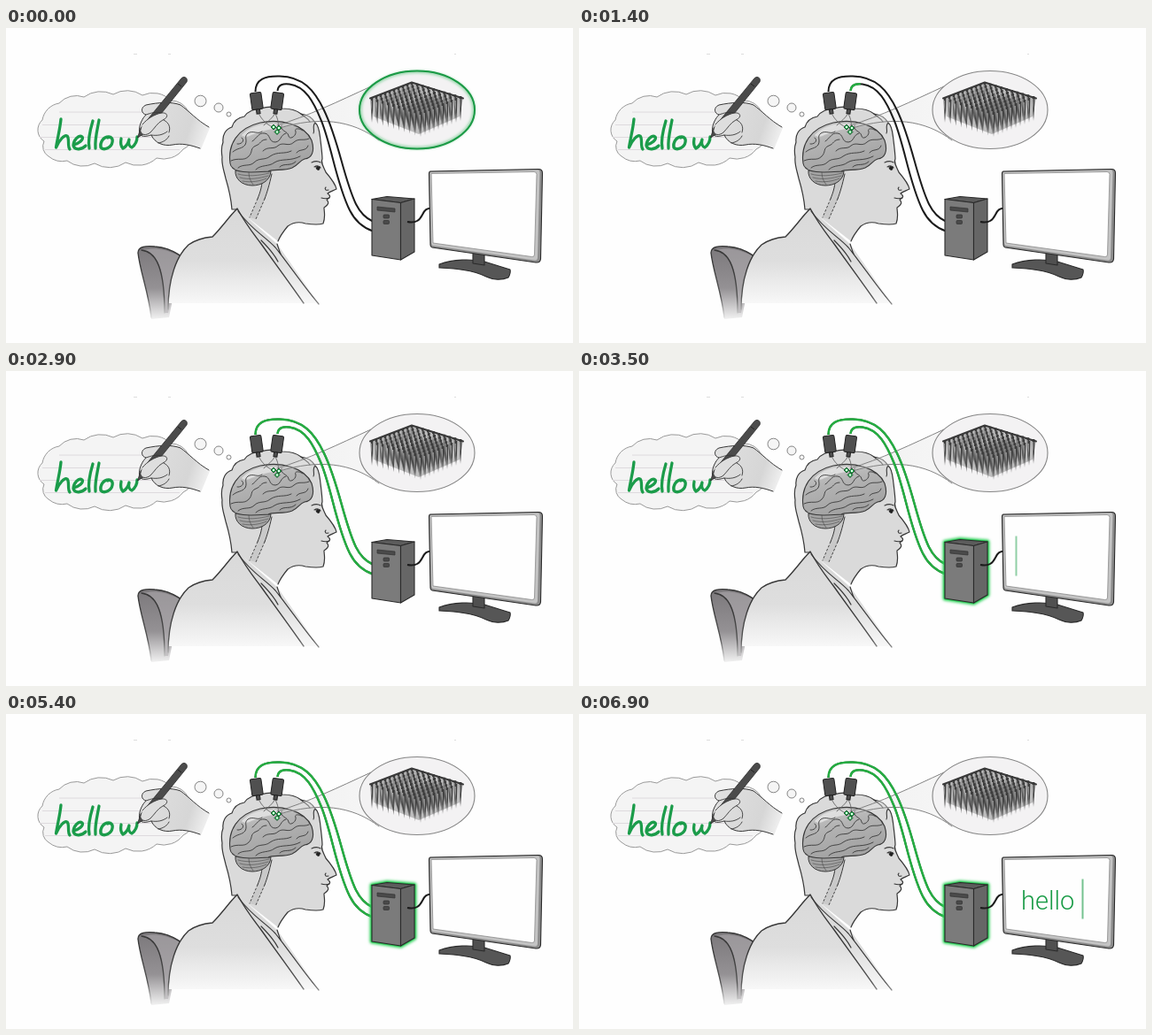
These frames come from a looping animation (640x356 px, 7 s). An HTML page:

```html
<!DOCTYPE html>
<html lang="en">
<head>
<meta charset="utf-8">
<title>Handwriting decoder</title>
<style>
html, body { margin: 0; width: 100%; height: 100%; overflow: hidden; background: #fefefe; }
svg { display: block; width: 100vw; height: 100vh; }
.ink { fill: none; stroke: #383838; stroke-linecap: round; stroke-linejoin: round; }
.pen { fill: none; stroke: #1b9c4a; stroke-width: 3.3; stroke-linecap: round; stroke-linejoin: round; }
.cable { fill: none; stroke: #1b1b1b; stroke-width: 2; }
.signal { fill: none; stroke: #25ad42; stroke-width: 2.5; stroke-dasharray: 100 200; }
.typed { font: 300 29px Roboto, "Liberation Sans", sans-serif; fill: #1a9c47; }

.ring, .signal, .glow, .caret, .bar { animation: 7s step-end infinite; }
.ring { animation-name: ring; }
.right { animation-name: right; }
.left { animation-name: left; }
.glow { animation-name: glow; }
.caret { animation-name: type; }
.bar { animation-name: blink; }

@keyframes ring {
  0% { opacity: 1; }
  10% { opacity: .93; }
  12.85% { opacity: .8; animation-timing-function: steps(5); }
  20%, 100% { opacity: 0; }
}
@keyframes right {
  0% { stroke-dashoffset: 100; }
  18.57% { stroke-dashoffset: 100; animation-timing-function: steps(14); }
  38.57%, 100% { stroke-dashoffset: 0; }
}
@keyframes left {
  0% { stroke-dashoffset: 100; }
  20% { stroke-dashoffset: 100; animation-timing-function: steps(14); }
  40%, 100% { stroke-dashoffset: 0; }
}
@keyframes glow {
  0% { opacity: 0; }
  42.85% { opacity: .5; }
  44.28%, 100% { opacity: 1; }
}
@keyframes blink {
  0% { opacity: 0; }
  47.14% { opacity: .8; }
  55.71% { opacity: 0; }
  65.71% { opacity: .8; }
  74.28% { opacity: 0; }
  82.85%, 100% { opacity: 1; }
}
@keyframes type {
  0% { transform: translateX(493.5px); }
  85.71% { transform: translateX(517px); }
  88.57% { transform: translateX(532px); }
  91.42% { transform: translateX(537.5px); }
  94.28% { transform: translateX(545px); }
  98.57%, 100% { transform: translateX(568.5px); }
}
</style>
</head>
<body>
<svg viewBox="0 0 640 356" preserveAspectRatio="none">
<defs>
  <linearGradient id="robe" gradientUnits="userSpaceOnUse" x1="0" y1="215" x2="0" y2="312">
    <stop offset="0" stop-color="#dadada"/><stop offset=".5" stop-color="#dedede"/><stop offset="1" stop-color="#f8f8f8"/>
  </linearGradient>
  <linearGradient id="line" gradientUnits="userSpaceOnUse" x1="0" y1="270" x2="0" y2="326">
    <stop offset="0" stop-color="#383838"/><stop offset=".6" stop-color="#555"/><stop offset="1" stop-color="#ddd"/>
  </linearGradient>
  <linearGradient id="seat" gradientUnits="userSpaceOnUse" x1="0" y1="250" x2="0" y2="330">
    <stop offset="0" stop-color="#7d7a7d"/><stop offset=".55" stop-color="#949194"/><stop offset="1" stop-color="#f4f4f4"/>
  </linearGradient>
  <linearGradient id="palm" gradientUnits="userSpaceOnUse" x1="152" y1="98" x2="229" y2="124">
    <stop offset="0" stop-color="#e0e0e0"/><stop offset=".7" stop-color="#d6d6d6"/><stop offset="1" stop-color="#f2f2f2"/>
  </linearGradient>
  <linearGradient id="cortex" x1="0" y1="0" x2=".4" y2="1">
    <stop offset="0" stop-color="#cdcdcd"/><stop offset=".45" stop-color="#b3b3b3"/><stop offset="1" stop-color="#a2a2a2"/>
  </linearGradient>
  <linearGradient id="beam" gradientUnits="userSpaceOnUse" x1="310" y1="0" x2="420" y2="0">
    <stop offset="0" stop-color="#ddd" stop-opacity=".3"/><stop offset="1" stop-color="#f4f4f4" stop-opacity=".7"/>
  </linearGradient>
  <filter id="soft" x="-30%" y="-30%" width="160%" height="160%"><feGaussianBlur stdDeviation="1.500"/></filter>
  <clipPath id="screen"><path d="M480 165 598 162.500 595 258 482 242.500Z"/></clipPath>
  <path id="tower" d="M413 193.500 430 190.500 461 193 461 253 445.500 262 413 257Z"/>
  <path id="outer" pathLength="100" d="M281.500 72C281.500 58 292 54 309 54.500 335 55 348 70 359 93 376 128 381 170 395 199 400 209 406 215 414 218.500"/>
  <path id="inner" pathLength="100" d="M306.500 71C307 64 313 62.500 320 63.500 338 66 347 83 356 105 368 135 373 176 388 206 395 220 404 226 414 229.500"/>
  <path id="head" d="M261 205 255 205C254 192 251 180 248 170 246 161 243 154 244 146 243 140 243 134 245 129 244 121 248 114 255 112 257 105 263 101 269 100 273 94 281 91 288 91 296 88 305 89 312 91 321 91 328 93 333 97 341 98 346 102 349 107 354 111 354 120 355 127 356 135 357 143 357 148 355 152 358 156 361 163 367 170 372 177 373 182 369 184 365 185 363 187 367 190 366 192 362 194 365 197 364 200 359 203 359 208 361 213 358 221 352 223 345 222 338 221 332 219 325 219 318 224 313 230 309 236 307 241 306 246"/>
</defs>
<rect width="640" height="356" fill="#fefefe"/>
<path d="M144 29.500h4m35 0h3m320 0h2" stroke="#ddd"/>

<!-- thought bubble -->
<path d="M43 128A15 15 0 0 1 41 104 23 23 0 0 1 60 85 26 26 0 0 1 88 78 32 32 0 0 1 121 75 31 31 0 0 1 154 76 28 28 0 0 1 186 82 21 21 0 0 1 206 95 17 17 0 0 1 211 119 18 18 0 0 1 200 137 28 28 0 0 1 170 147 31 31 0 0 1 135 152 32 32 0 0 1 100 153 29 29 0 0 1 69 150 24 24 0 0 1 48 145 13 13 0 0 1 43 128Z" fill="#f4f4f4" stroke="#9a9a9a"/>
<path d="M60 95H200M41 109.500H205M38 123.500H205M44 137.500H196" stroke="#dedade" fill="none"/>
<g fill="#f5f5f5" stroke="#858585"><ellipse cx="219.500" cy="82.500" rx="6.500" ry="6.300"/><circle cx="240" cy="90" r="5"/><circle cx="251.500" cy="97.500" r="2.500"/></g>
<g class="pen">
  <path d="M62 103C61 114 58 125 56.500 135 60 127 66 120 69 122 72 125 69 133 72 137"/>
  <path d="M76 132C82 131 88 126 86 123 82 120 76 127 76 133 78 139 86 137 90 133"/>
  <path d="M98 105C95 115 92 126 94 136M105 104C103 115 100 126 101 136"/>
  <path d="M116 123C109 123 106 130 107 135 111 139 119 135 120 129 121 125 118 122 115 124"/>
  <path d="M130 125C129 130 130 134 132 136 136 134 138 130 139 126 138 130 139 134 142 135 146 132 148 128 148 123"/>
</g>

<!-- hand and stylus -->
<path d="M230 113C215 104 207 94 197 87 187 83 172 84 158 87 151 90 153 97 158 98 152 104 149 114 151 120 154 124 160 122 164 121 168 130 178 134 188 132 200 130 210 133 220 137Z" fill="url(#palm)"/>
<path class="ink" stroke-width="1" d="M229 112C215 104 207 94 197 87 187 83 172 84 158 87 151 90 153 97 158 98 152 104 149 114 151 120 154 124 160 122 164 121 168 130 178 134 188 132 198 130 208 132 219 136"/>
<path d="M148.500 124 152 113 197 58C200 53 206 56 204 61L158 118Z" fill="#4b4b4b" stroke="#2d2d2d" stroke-width=".8"/>
<path d="M194 63 198 66" stroke="#222"/>
<path d="M154 109C160 102 167 98 175 96 183 95 184 101 177 104 171 107 168 113 163 118 158 122 153 121 152 117Z" fill="#dedede"/>
<path class="ink" stroke-width=".9" d="M154 109C160 102 167 98 175 96 183 95 184 101 177 104 171 107 168 113 163 118 158 122 153 121 152 117M158 98C164 96 170 94 175 96M164 121C171 122 177 121 182 117M178 104C184 107 186 112 184 118M172 130C178 129 182 126 184 122"/>

<!-- chair -->
<path d="M149 254C150 247 158 246 168 247 181 248 190 252 198 257L184 327 164 329C161 300 152 275 149 254Z" fill="url(#seat)"/>
<path d="M155 251C171 253 179 272 179 322L183 322 197 258C184 251 168 247 155 251Z" fill="#b3b0b3" opacity=".55"/>
<path class="ink" style="stroke:url(#line)" stroke-width="1.400" d="M164 327C161 299 151 274 149 254 149 247 158 246 168 247 181 248 189 252 196 257M153 251C170 253 179 272 179 322"/>

<!-- robe and head -->
<path d="M261 204C252 213 243 226 233 236 221 237 213 240 206 245 192 258 184 284 183 311H353L306 244Z" fill="url(#robe)"/>
<use href="#head" fill="#dadada"/>
<path d="M261 205 306 246 289 239Z" fill="#dadada"/>
<use href="#head" class="ink" stroke-width="1.200"/>
<path class="ink" stroke-width="1.100" d="M345 152C349 150 352 150 355 152M348 157C351 155 354 156 355 158M350 157C350 160 353 161 354 159M356 192C359 193 362 193 365 192M361 180C359 182 361 184 364 183M349 107C345 111 349 116 347 119M333 97C337 101 341 102 343 106"/>
<path d="M351 156 355 157 353 161 350 159Z" fill="#222"/>
<g class="ink" style="stroke:url(#line)" stroke-width="1.400">
  <path d="M183 318C183 284 192 258 206 245 213 240 221 237 233 236 243 226 252 213 261 204 272 224 280 233 288 244 303 265 320 288 336 311"/>
  <path d="M233 236C255 249 280 255 301 263" stroke-width="0"/>
  <path d="M262 207C278 229 292 235 304 248 320 268 336 292 353 312M306 244C308 250 309 254 311 257M288 240C300 252 304 258 307 264" stroke-width="1.200"/>
</g>

<!-- brain -->
<path d="M289 163C290 180 285 194 275 214L282 216C291 199 296 184 300 164Z" fill="#c9c9c9"/>
<path class="ink" stroke-width="1" d="M289 165C290 178 287 185 284 193M300 165C297 178 295 185 292 193"/>
<path class="ink" stroke-width=".9" stroke-dasharray="2 2.500" d="M284 193 275 214M292 193 282 216"/>
<path d="M259 161C258 170 266 178 278 178 288 178 298 173 299 162Z" fill="#a3a3a3" stroke="#383838"/>
<path class="ink" stroke-width=".5" d="M262 165C272 168 285 167 297 164M264 169C274 172 286 170 296 167M267 173C277 175 287 173 294 170M274 163C274 169 276 173 279 177"/>
<path d="M253 153C250 132 261 113 287 107 310 102 337 109 345 127 349 140 345 147 337 148 331 150 330 155 323 158 313 162 302 159 296 162 281 163 255 166 253 153Z" fill="url(#cortex)" stroke="#383838" stroke-width="1.100"/>
<path d="M266 121C276 110 294 106 312 109 306 115 292 114 284 119 276 120 271 126 266 121Z" fill="#ececec" opacity=".7"/>
<g class="ink" stroke-width=".9">
  <path d="M256 140C262 135 266 137 270 132 273 126 268 123 273 119 279 115 284 121 289 117"/>
  <path d="M254 150C263 146 268 151 274 145 279 140 275 136 282 133 288 131 287 126 294 126"/>
  <path d="M262 158C268 153 275 157 280 152 286 146 292 150 298 145 307 139 314 143 322 139"/>
  <path d="M282 160C288 154 297 157 303 152 311 147 321 151 332 145"/>
  <path d="M278 128C284 124 285 118 292 119 299 120 296 129 304 129 311 128 309 121 316 119"/>
  <path d="M290 139C296 133 302 138 307 133 313 128 319 135 325 129 331 124 335 128 342 125"/>
  <path d="M311 110C309 117 318 116 319 122 320 127 328 122 327 117 325 113 331 113 335 116"/>
  <path d="M328 141C331 136 339 140 341 133M309 157C314 152 321 157 327 151M266 124C271 128 264 132 261 131"/>
</g>

<!-- zoom beam and array -->
<path d="M308 111C340 100 375 83 412 66L424 128C400 108 365 100 311 113Z" fill="url(#beam)"/>
<path class="ink" stroke-width=".9" d="M306 110C340 100 375 83 412 66M309 113C352 100 390 103 421 127" style="stroke:#777"/>
<ellipse cx="464" cy="92.500" rx="65" ry="44" fill="#f3f2f3" stroke="#858585" stroke-width="1.100"/>
<g class="ring" fill="none">
  <ellipse cx="464" cy="92.500" rx="64" ry="43" stroke="#8fd3a4" stroke-width="3" filter="url(#soft)"/>
  <ellipse cx="464" cy="92.500" rx="65" ry="44" stroke="#1a9a45" stroke-width="2"/>
</g>
<path d="M412 79 458 61 516 79 512 100 466 120 415 100Z" fill="#8a8a8a" opacity=".5"/>
<g id="array"></g>
<path class="ink" stroke-width="2" d="M411 79.500 458 61.500 516 79.500"/>

<!-- implants -->
<path class="ink" stroke-width=".9" d="M285 96C288 103 294 109 301 112M304 96C301 102 295 106 291 110M304 97C307 103 308 107 307 115" style="stroke:#666"/>
<g fill="#27b252" stroke="#173d22" stroke-width=".8">
  <path d="M302 109 305 112 302 115 299 112Z"/><path d="M308 110 311 113 308 116 305 113Z"/><path d="M306 114.500 309 117.500 306 120.500 303 117.500Z"/>
</g>
<path d="M301 112h2m4 1h2m-4 4.500h2" stroke="#e9fff0" stroke-width="2"/>

<use href="#outer" class="cable"/>
<use href="#inner" class="cable"/>
<use href="#outer" class="signal left"/>
<use href="#inner" class="signal right"/>
<g fill="#505050" stroke="#222">
  <g transform="rotate(-8 283 82)"><rect x="276.500" y="73" width="12.500" height="19" rx="1.500"/><rect x="281" y="92" width="4" height="5"/></g>
  <g transform="rotate(8 306 82)"><rect x="300" y="73" width="12.500" height="19" rx="1.500"/><rect x="304" y="92" width="4" height="5"/></g>
</g>

<!-- computer -->
<g class="glow" fill="none" stroke-linejoin="round">
  <use href="#tower" stroke="#2fd25a" stroke-width="5" filter="url(#soft)"/>
  <use href="#tower" stroke="#28c052" stroke-width="2.500"/>
</g>
<g stroke="#2a2a2a" stroke-width="1.100" stroke-linejoin="round">
  <path d="M413 193.500 430 190.500 461 193 445.500 197.500Z" fill="#5c5c5c"/>
  <path d="M413 193.500 445.500 197.500 445.500 262 413 257Z" fill="#7b7b7b"/>
  <path d="M445.500 197.500 461 193 461 253 445.500 262Z" fill="#666"/>
</g>
<g fill="#4a4a4a" stroke="#333" stroke-width=".7">
  <path d="M419 202 439 204 439 208 419 206Z"/><rect x="426" y="211" width="6.500" height="4" rx="1"/><rect x="426" y="217.500" width="6.500" height="4" rx="1"/>
</g>
<path class="cable" d="M453 219C463 221 467 217 470 211 473 205 475 204 480 203.500"/>

<!-- monitor -->
<g stroke="#2a2a2a" stroke-width="1.100" stroke-linejoin="round">
  <path d="M489 267C505 261 525 261 540 264L569 273Q570 277 567 282C560 285 550 285 542 281 526 273 506 272 489 271Z" fill="#565656"/>
  <path d="M527 252 540 254 540 268 527 266Z" fill="#505050"/>
  <path d="M479 162 601 159.500Q605.500 159.500 605.500 164L603.500 261Q603 265.500 598 265L481 248Q479 247.500 479 245L477.500 165Q477.500 162 479 162Z" fill="#8c8c8c"/>
</g>
<path d="M479 163 600 160.500Q602.500 160.500 602.500 163.500L600 260Q599.500 263 597 262.500L482 246Q480 245.500 480 243L478.500 165Z" fill="#c4c4c4"/>
<path d="M480 164.500 596 162.500Q599 162.500 599 165.500L596.500 256Q596.500 259 593.500 258.500L482 243Z" fill="#fefefe" stroke="#8a8a8a" stroke-width=".8"/>
<g clip-path="url(#screen)">
  <text class="typed" x="499" y="220.500">hello</text>
  <g class="caret">
    <rect y="184" width="72" height="50" fill="#fefefe"/>
    <path class="bar" d="M0 186.500V231.500" stroke="#1a9c47" stroke-width="1.200"/>
  </g>
</g>
</svg>
<script>
// 10 x 10 needles hanging from a tilted plate, back to front.
const n = 9;
let needles = '';
for (let j = 0; j <= n; j++) {
  for (let i = n; i >= 0; i--) {
    const x = 413 + (i * 45 + j * 55) / n;
    const y = 80 + (j * 16 - i * 18) / n;
    const at = (dx, dy) => `${(x + dx).toFixed(1)} ${(y + dy).toFixed(1)}`;
    needles += `<path d="M${at(-1.4, -1)}L${at(1.4, -1)}L${at(1, 13)}L${at(0, 27)}L${at(-1, 13)}Z" fill="#3d3d3d"/>` +
      `<path d="M${at(-1.5, 2)}L${at(-0.3, 2)}L${at(-0.2, 20)}Z" fill="#adadad"/>`;
  }
}
document.getElementById('array').innerHTML = needles;
</script>
</body>
</html>
```
